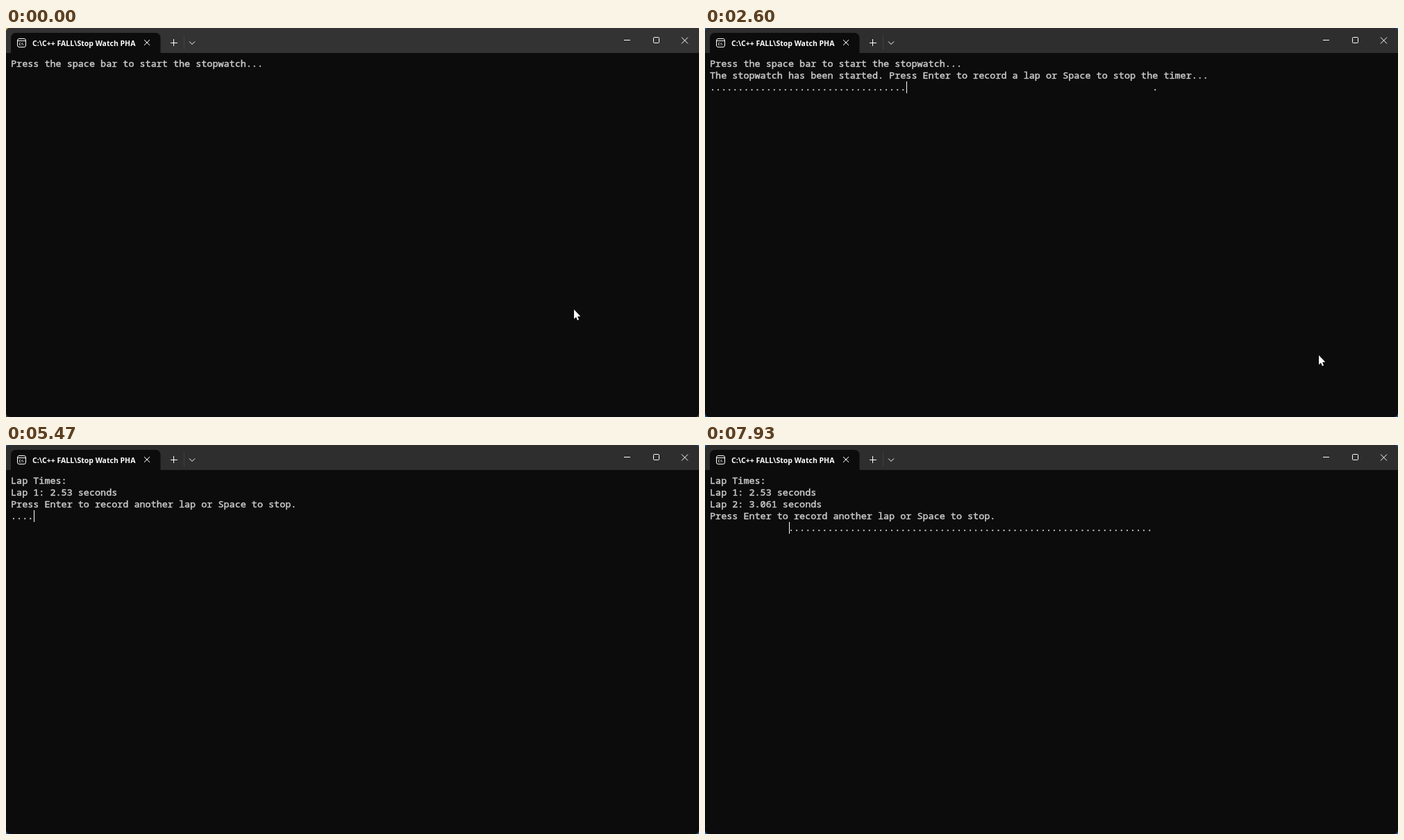
An HTML page with a canvas that plays this animation: 998 px wide and 561 px high, repeating every 8 s.

```html
<!DOCTYPE html>
<html lang="en">
<head>
<meta charset="utf-8">
<title>Stopwatch console</title>
<style>
  html, body { margin: 0; width: 100%; height: 100%; overflow: hidden; background: #0c0c0c; }
  canvas { display: block; }
</style>
</head>
<body>
<canvas id="stage" width="998" height="561"></canvas>
<script>
const ctx = document.getElementById('stage').getContext('2d');
const LOOP = 8000, FPS = 15;
const CELL = 8.0664, LINE = 17, LEFT = 7, TOP = 43, BASELINE = 13;
const MONO = '500 13.444px "Noto Sans Mono", "DejaVu Sans Mono", monospace';
const TITLE = '700 10.5px "Open Sans", "Noto Sans", sans-serif';

// All times below are ticks of 1/15 s.
const FOCUS = 7, START = 10.2, SCROLLBAR_END = 26;
const WIDTH = 79;                // dots per sweep
const LAPS = [253, 559];         // printed characters at each lap
const PRINTED = [[START, 0], [23, 85], [39, 193], [63, 352], [82, 478], [101, 606], [119, 725]];
const MOUSE_X = [[0, 818], [2, 938], [3, 938], [7, 884]];
const MOUSE_Y = [[0, 406], [2, 429], [3, 429], [7, 472]];

const WAITING = ['Press the space bar to start the stopwatch...'];
const RUNNING = [...WAITING,
  'The stopwatch has been started. Press Enter to record a lap or Space to stop the timer...'];
const LAP_TIMES = ['Lap 1: 2.53 seconds', 'Lap 2: 3.061 seconds'];

function interpolate(points, x) {
  if (x <= points[0][0]) return points[0][1];
  for (let i = 1; i < points.length; i++) {
    const [x0, y0] = points[i - 1], [x1, y1] = points[i];
    if (x <= x1) return y0 + (y1 - y0) * (x - x0) / (x1 - x0);
  }
  return points[points.length - 1][1];
}

function rect(color, x, y, w, h) {
  ctx.fillStyle = color;
  ctx.fillRect(x, y, w, h);
}

function trace(points) {
  ctx.beginPath();
  points.forEach(([x, y]) => ctx.lineTo(x, y));
}

function line(color, ...points) {
  trace(points);
  ctx.strokeStyle = color;
  ctx.stroke();
}

function polygon(color, ...points) {
  trace(points);
  ctx.closePath();
  ctx.fillStyle = color;
  ctx.fill();
}

function rounded(x, y, w, h, radius) {
  ctx.beginPath();
  ctx.roundRect(x, y, w, h, radius);
}

function cross(x, y, r) {
  line('#fff', [x - r, y - r], [x + r, y + r]);
  line('#fff', [x - r, y + r], [x + r, y - r]);
}

// A thin outline gives the console face its heavier stems.
function print(text, row, col = 0) {
  ctx.font = MONO;
  ctx.fillStyle = ctx.strokeStyle = '#ccc';
  ctx.lineWidth = 0.45;
  [...text].forEach((char, i) => {
    const x = LEFT + (col + i) * CELL, y = TOP + row * LINE + BASELINE;
    ctx.fillText(char, x, y);
    ctx.strokeText(char, x, y);
  });
}

function caret(row, col) {
  rect('#fff', Math.round(LEFT + 0.6 + col * CELL), TOP + row * LINE, 1, LINE);
}

function drawWindow(focused) {
  rect(focused ? '#1f5288' : '#3c3c3c', 0, 0, 998, 561);
  if (!focused) rect('#c9a63c', 0, 0, 4, 4);
  rounded(0, 0, 998, 561, 6);
  ctx.fillStyle = '#0c0c0c';
  ctx.fill();
  rounded(0, 0, 998, 36, [6, 6, 0, 0]);
  ctx.fillStyle = focused ? '#2e2e2e' : '#333';
  ctx.fill();
  rounded(7, 7, 215.5, 29, [7, 7, 0, 0]);
  ctx.fillStyle = '#0c0c0c';
  ctx.fill();

  ctx.lineWidth = 1;
  ctx.strokeStyle = '#fff';
  rounded(16.5, 15.5, 12, 12, 2.5);
  ctx.stroke();
  line('#fff', [17, 18.5], [28, 18.5]);
  ctx.fillStyle = '#fff';
  ctx.font = '700 5px "Open Sans", sans-serif';
  ctx.fillText('C:\\', 18.5, 25);
  ctx.font = TITLE;
  ctx.fillText('C:\\C++ FALL\\Stop Watch PHA', 38, 26);

  cross(203, 21, 4);
  line('#fff', [237, 21.5], [247, 21.5]);
  line('#fff', [241.5, 16], [241.5, 26]);
  line('#424242', [256.5, 11], [256.5, 31]);
  line('#fff', [264, 19.5], [268, 23.5], [272, 19.5]);
  line('#fff', [890, 17.5], [899, 17.5]);
  rounded(932.5, 13.5, 8, 8, 1);
  ctx.stroke();
  cross(977.5, 18, 4.5);
}

function drawScrollbar() {
  rect('#121212', 984, 36, 14, 520);
  polygon('#444', [987, 47.5], [990.5, 42], [994, 47.5]);
  polygon('#444', [987, 549.5], [990.5, 555], [994, 549.5]);
}

function drawMouse(x, y) {
  ctx.save();
  ctx.translate(x, y);
  polygon('#fff', [0, 0], [0, 13.5], [3, 10.8], [5, 15.5], [7, 14.6], [5.1, 10], [9.3, 9.7]);
  ctx.restore();
}

// Sweeps of dots, each wiped by spaces; a lap clears the screen and homes the caret.
function drawSweep(printed, laps, row) {
  const step = printed % (2 * WIDTH);
  const wiped = step - WIDTH;
  const sinceLap = laps ? printed - LAPS[laps - 1] : Infinity;
  if (!laps && printed >= WIDTH) print('.', row, WIDTH);
  if (wiped < 0) {
    print('.'.repeat(step), row);
    caret(row, step);
  } else if (sinceLap < wiped) {
    caret(row, sinceLap);
  } else {
    print('.'.repeat(WIDTH - wiped), row, wiped);
    caret(row, wiped);
  }
}

function draw(ms) {
  const tick = Math.floor((ms + 4) * FPS / 1000);
  const printed = Math.floor(interpolate(PRINTED, tick) + 1e-6);
  const laps = LAPS.filter(lap => printed >= lap).length;
  const started = tick >= START, focused = tick >= FOCUS;
  const lines = laps
    ? ['Lap Times:', ...LAP_TIMES.slice(0, laps), 'Press Enter to record another lap or Space to stop.']
    : started ? RUNNING : WAITING;

  drawWindow(focused);
  if (focused && tick < SCROLLBAR_END) drawScrollbar();
  lines.forEach((text, row) => print(text, row));
  if (started) drawSweep(printed, laps, lines.length);
  else if (focused) caret(lines.length, 0);
  if (!laps) drawMouse(interpolate(MOUSE_X, tick), interpolate(MOUSE_Y, tick));
}

const begin = performance.now();
function frame() {
  draw((performance.now() - begin) % LOOP);
  requestAnimationFrame(frame);
}
frame();
</script>
</body>
</html>
```
